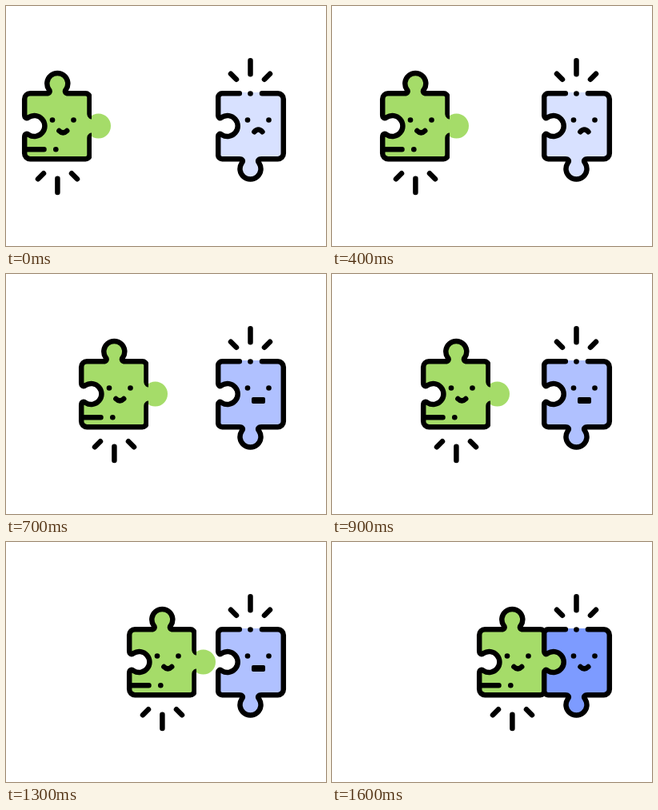
Write an HTML page that moves like this. It is 400 by 300 pixels and loops after 2.1 s.

```html
<!DOCTYPE html>
<html lang="en">
<head>
<meta charset="utf-8">
<title>Puzzle pieces</title>
<style>
  html, body { margin: 0; width: 100%; height: 100%; overflow: hidden; background: #fff; }
  svg { display: block; width: 400px; height: 300px; }
  .line { fill: none; stroke: #000; stroke-width: 6.5; stroke-linecap: round; stroke-linejoin: round; }
  .green { fill: #a5dc69; }
  .slide { animation: slide 2100ms infinite; }
  .tint { animation: tint 2100ms step-end infinite; }
  .sad { animation: sad 2100ms step-end infinite; }
  .calm { animation: calm 2100ms step-end infinite; }
  .happy { animation: happy 2100ms step-end infinite; }

  @keyframes slide {
    0% { transform: translateX(0); animation-timing-function: steps(5); }
    23.809% { transform: translateX(50px); animation-timing-function: step-end; }
    28.571% { transform: translateX(61px); animation-timing-function: steps(10); }
    76.19%, 100% { transform: translateX(161px); }
  }
  @keyframes tint {
    0% { fill: #d8e1ff; }
    33.333% { fill: #b0c1ff; }
    66.666%, 100% { fill: #7d9bff; }
  }
  @keyframes sad { 0% { opacity: 1; } 33.333%, 100% { opacity: 0; } }
  @keyframes calm { 0% { opacity: 0; } 33.333% { opacity: 1; } 66.666%, 100% { opacity: 0; } }
  @keyframes happy { 0% { opacity: 0; } 66.666%, 100% { opacity: 1; } }
</style>
</head>
<body>
<svg viewBox="0 0 400 300">
  <defs>
    <clipPath id="greenEdge"><rect x="0" y="60" width="107" height="190"/></clipPath>
    <clipPath id="blueEdge"><rect x="262" y="50" width="138" height="190"/></clipPath>
    <g id="eyes"><circle r="3.3"/><circle cx="26.5" r="3.3"/></g>
    <path id="smile" class="line" d="M-4.9 0Q0 4.8 4.9 0"/>
  </defs>

  <g class="slide">
    <circle class="green" cx="115.6" cy="150" r="15.4"/>
    <path class="green" d="M30.2 109.3H50.5C54.5 109.3 55.8 106.6 53.4 104A13 13 0 1 1 75.2 104C72.8 106.6 74.1 109.3 78.1 109.3H99.5A5 5 0 0 1 104.5 114.3V186.2A5 5 0 0 1 99.5 191.2H30.2A7 7 0 0 1 23.2 184.2V164C23.2 160 25.9 158.7 28.5 161A13 13 0 1 0 28.5 139C25.9 141.3 23.2 140 23.2 136V116.3A7 7 0 0 1 30.2 109.3Z"/>
    <g clip-path="url(#greenEdge)">
      <path class="line" d="M109 138Q104.8 139.2 104.5 135V114.3A5 5 0 0 0 99.5 109.3H78.1C74.1 109.3 72.8 106.6 75.2 104A13 13 0 1 0 53.4 104C55.8 106.6 54.5 109.3 50.5 109.3H30.2A7 7 0 0 0 23.2 116.3V136C23.2 140 25.9 141.3 28.5 139A13 13 0 1 1 28.5 161C25.9 158.7 23.2 160 23.2 164V184.2A7 7 0 0 0 30.2 191.2H99.5A5 5 0 0 0 104.5 186.2V165Q104.8 160.8 109 162"/>
    </g>
    <path class="line" d="M24 179.2H47.5M64.4 215.8V233M47 209.2L40 216.2M82 209.2L89 216.2"/>
    <circle cx="62.3" cy="179.2" r="3.3"/>
    <use href="#eyes" x="58" y="142.5"/>
    <use href="#smile" x="71.3" y="156"/>
  </g>

  <path class="tint" d="M265.2 113.5Q265.2 108 270.2 108H340A7 7 0 0 1 346.8 116V184.2A7 7 0 0 1 339.8 191.2H319.3C315.3 191.2 314 193.9 316.4 196.5A13 13 0 1 1 294.6 196.5C297 193.9 295.7 191.2 291.7 191.2H270.2A5 5 0 0 1 265.2 186.2V164C265.2 160 267.2 158.7 269.8 161A13 13 0 1 0 269.8 139C267.2 141.3 265.2 140 265.2 136Z"/>
  <g clip-path="url(#blueEdge)">
    <path class="line" d="M291.8 109.3H270.2A5 5 0 0 0 265.2 114.3V136C265.2 140 267.2 141.3 269.8 139A13 13 0 1 1 269.8 161C267.2 158.7 265.2 160 265.2 164V186.2A5 5 0 0 0 270.2 191.2H291.7C295.7 191.2 297 193.9 294.6 196.5A13 13 0 1 0 316.4 196.5C314 193.9 315.3 191.2 319.3 191.2H339.8A7 7 0 0 0 346.8 184.2V116.3A7 7 0 0 0 339.8 109.3H320"/>
  </g>
  <path class="line" d="M305.5 68.3V85.2M281 84.8L288 91.8M330 84.8L323 91.8"/>
  <circle cx="305.5" cy="109.5" r="3.3"/>
  <use href="#eyes" x="302" y="142.5"/>
  <path class="line sad" d="M310.4 157.2Q315.4 152 320.4 157.2"/>
  <rect class="calm" x="307" y="154" width="17" height="8" rx="2"/>
  <g class="happy"><use href="#smile" x="315.4" y="156"/></g>
</svg>
</body>
</html>
```
